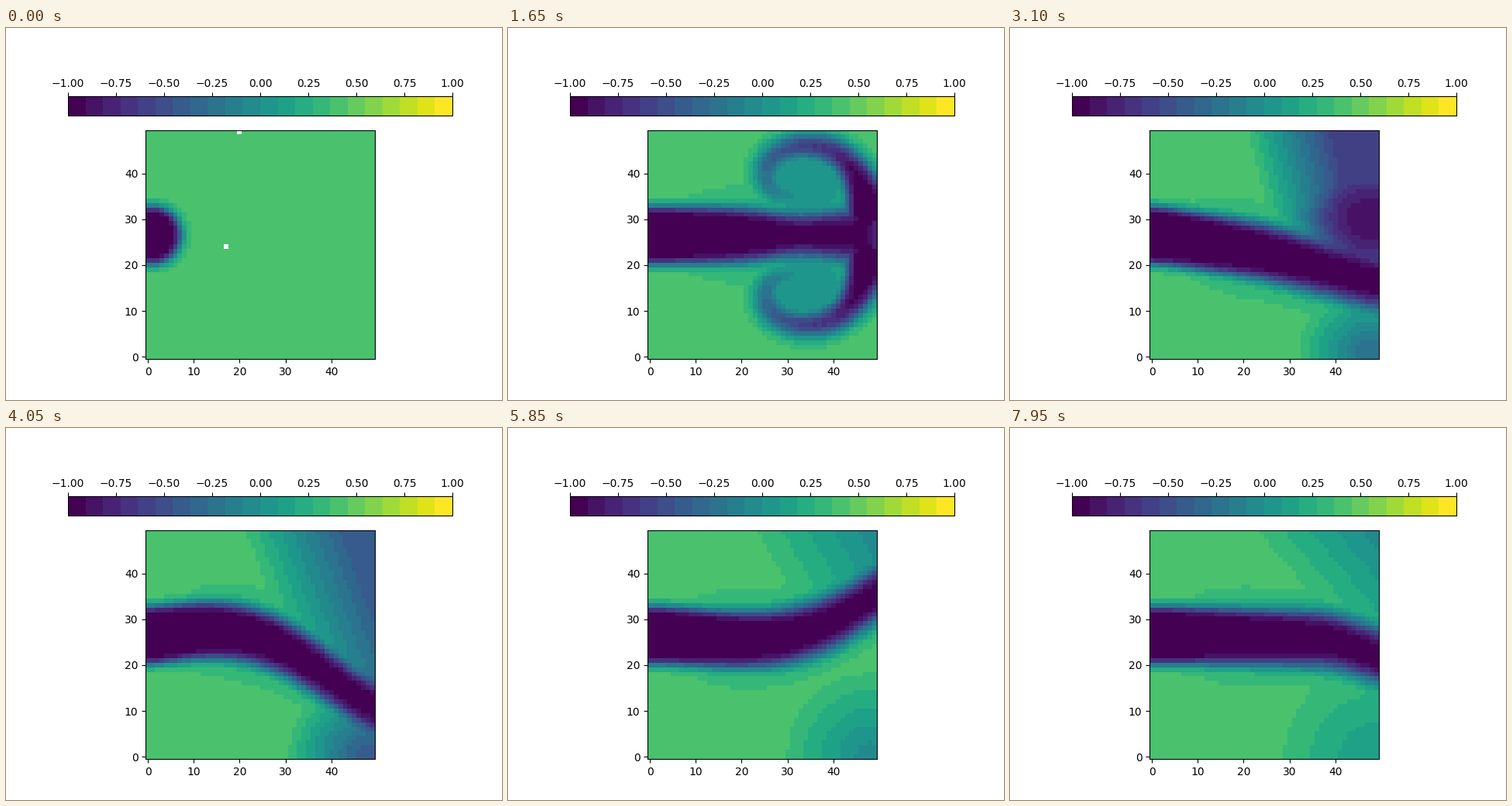
Recreate the animation shown at these times as a matplotlib script. Size 640 by 480 pixels, loop 8 s.

```python
import numpy as np
import matplotlib.pyplot as plt
from matplotlib.animation import FuncAnimation

N = 50                # cells per side
FRAMES, STEP = 160, 50
STILL = 0.42          # value of the fluid at rest
MID = 26.5            # row of the inlet
SPEED = 60            # columns per second at which bends drift downstream

# Swings of the jet at the outlet: rows moved, start (s), duration (s)
SWINGS = [(-11, 2.4, 0.8), (-5, 3.5, 0.5), (31, 4.05, 0.9),
          (-20, 5.5, 1.0), (3.7, 7.9, 0.3)]

X, Y = np.meshgrid(np.arange(N, dtype=float), np.arange(N, dtype=float))


def ease(u):
    u = np.clip(u, 0, 1)
    return u * u * (3 - 2 * u)


def soft(z):
    """Soft step from 0 to 1."""
    return 0.5 * (1 + np.tanh(z / 2))


def bump(x, centre, width):
    return np.exp(-((x - centre) / width) ** 2)


def tip(t):
    return 8 + 29 * t - 1.2 * t * t


def cap_size(t):
    return 1.1 * (1 - np.exp(-1.45 * t))


def jet_axis(t):
    """Bends start upstream and grow as they travel to the outlet."""
    when = t + (N - X) / SPEED
    sway = sum(rows * ease((when - start) / span) for rows, start, span in SWINGS)
    return MID + sway * (X / N) ** 1.5


def jet(t, axis):
    """Depth of the jet and of the thin layer around it."""
    size = cap_size(t)
    half = 6.2 - 0.015 * X - 1.4 * size * bump(X, tip(t) - 20 * size, 9)
    dist = np.hypot(np.maximum(X - tip(t) + 7, 0), Y - axis)
    body = 1.5 * soft((half - dist) / (0.6 + 0.018 * X))
    layer = 0.14 * min(1, t) * np.clip(X / 20, 0, 1) * soft((half + 4.5 - dist) / 1.2)
    return np.maximum(body, layer)


def cap(t):
    """Depth of the mushroom cap: a spiral mirrored about the inlet row."""
    if t > 3:
        return np.zeros_like(X)
    size = cap_size(t)
    u = np.linspace(0, 1, 64)
    angle = np.radians(-29 + 264 * u)
    radius = 7.6 - 3.5 * u ** 4 + 4.8 * np.exp(-10 * u)
    half = 2.3 + 2 * np.exp(-6 * u)
    depth = 1.6 - 1.1 * u

    x = (X - tip(t) + 19 * size)[..., None]
    y = (np.abs(Y - MID) - 12 * size)[..., None]
    dist = np.hypot(x - 1.3 * size * radius * np.cos(angle),
                    y - size * radius * np.sin(angle))
    arm = (depth * soft(half * size - dist)).max(axis=-1)
    eye = 0.42 * soft(7.5 * size - np.hypot(x / 1.3, y))[..., 0]
    return min(1, 3 * size) * np.maximum(arm, eye)


def haze(t, axis):
    """Depth of the diluted fluid in the corners above and below the jet."""
    shift = 20 + 0.12 * (t - 1) * (N - 1 - Y)
    ramp = np.clip((X - shift) / min(31, 6 * t), 0, 1)
    above = (0.5 + 0.5 * bump(t, 3.4, 1.2)) * ramp * soft((Y - axis) / 1.5)

    reach = np.hypot(X - 48, Y) / (17 + 1.2 * (t - 3))
    ramp = np.clip(1.15 * (1 - reach), 0, 1)
    below = (0.3 + 0.5 * bump(t, 4, 1.6)) * ramp * soft((axis - Y) / 1.5)
    return ease((t - 1.6) / 1.2) * (above + below)


def pool(t):
    """Dark remains of the cap while it leaves through the outlet."""
    dist = np.hypot((X - 48) / 1.5, Y - 30)
    return 1.7 * bump(t, 2.8, 0.5) * soft((9 - dist) / 1.8)


def field(t):
    axis = jet_axis(t)
    parts = jet(t, axis), cap(t), haze(t, axis), pool(t)
    total = sum(p ** 4 for p in parts) ** 0.25
    return np.clip(STILL - total, -1, 1)


fig, ax = plt.subplots(figsize=(6.4, 4.8), dpi=100)
image = ax.imshow(field(0), cmap=plt.get_cmap("viridis", 22), vmin=-1, vmax=1,
                  origin="lower", interpolation="nearest")
fig.colorbar(image, ax=ax, location="top")


def draw(i):
    image.set_data(field(i * STEP / 1000))
    return [image]


anim = FuncAnimation(fig, draw, frames=FRAMES, interval=STEP, repeat=True,
                     repeat_delay=0, blit=False)
plt.show()
```
